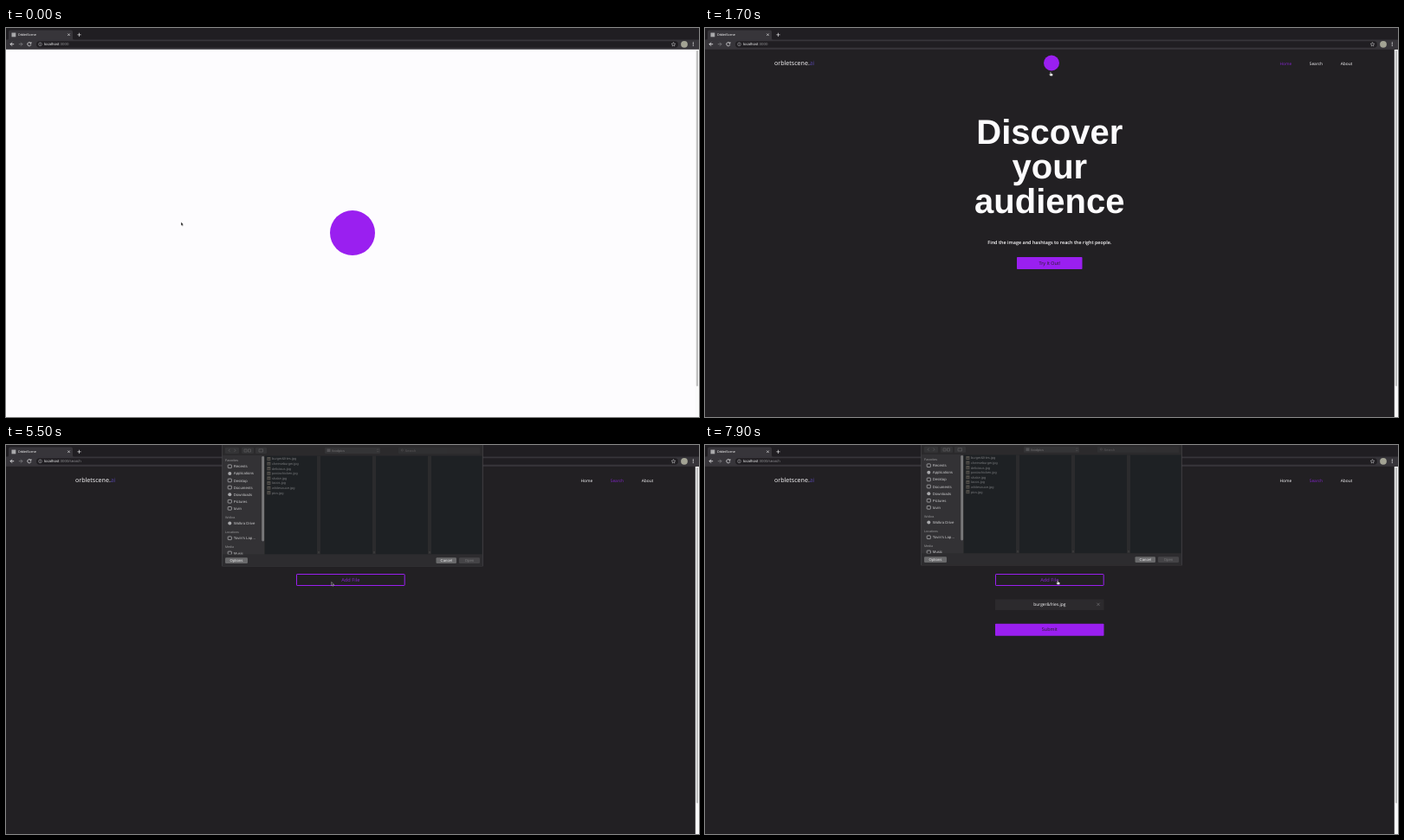
These frames come from a looping animation (800x450 px, 8 s). An HTML page:

```html
<!DOCTYPE html>
<html lang="en">
<head>
<meta charset="utf-8">
<title>OrbletScene</title>
<style>
  html, body { margin: 0; width: 100%; height: 100%; overflow: hidden; background: #222023; }
  svg { display: block; width: 800px; height: 450px; --bg: #fdfcfe; --fg: #2a282c; --accent: #9a1ff0; --tld: #9a1ff0; }
  text { font-family: "Open Sans", "Noto Sans", sans-serif; text-rendering: geometricPrecision; white-space: pre; }
  .ui { font-family: "Liberation Sans", Arial, sans-serif; }
  .mid { text-anchor: middle; }
</style>
</head>
<body>
<svg id="stage" viewBox="0 0 800 450" xmlns="http://www.w3.org/2000/svg"></svg>
<script>
const LOOP = 8000;
const PURPLE = '#9a1ff0';
const LIGHT = [253, 252, 254], DARK = [34, 32, 35];
const HANDLE = 'heartysupperlane';
const stage = document.getElementById('stage');

// Markup helpers
const rect = (x, y, w, h, fill, more = '') =>
  `<rect x="${x}" y="${y}" width="${w}" height="${h}" fill="${fill}" ${more}/>`;
const disc = (x, y, r, fill, more = '') => `<circle cx="${x}" cy="${y}" r="${r}" fill="${fill}" ${more}/>`;
const line = (d, color, width = 0.8, more = '') =>
  `<path d="${d}" fill="none" stroke="${color}" stroke-width="${width}" ${more}/>`;
const label = (x, y, size, fill, str, more = '') =>
  `<text x="${x}" y="${y}" font-size="${size}" fill="${fill}" ${more}>${str}</text>`;
const mid = (y, size, fill, str, more = '') => label(397.8, y, size, fill, str, `class="mid" ${more}`);
const ui = (x, y, size, fill, str, more = '') => label(x, y, size, fill, str, `class="ui" ${more}`);
const group = (id, content) => `<g id="${id}">${content}</g>`;

function browser() {
  const icon = '#e4e4e6';
  return rect(0, 0, 800, 14, '#201e22') +
    '<path d="M1 14q2 0 2-2V4.500q0-2 2-2H75q2 0 2 2V12q0 2 2 2z" fill="#37353a"/>' +
    rect(0, 13.5, 800, 11.3, '#37353a') +
    rect(6.5, 5.500, 4.8, 4.8, '#a9a9ab') +
    ui(13.7, 9.2, 3.8, '#eeeeef', 'OrbletScene') +
    line('M71.300 6.500l2.400 2.400m0-2.400l-2.400 2.400M82.400 7.800h4.200m-2.100-2.100v4.200', icon, 0.7) +
    line('M9.200 18.700H5m2-2l-2 2 2 2', icon, 0.9) +
    line('M14.800 18.700H19m-2-2l2 2-2 2', '#77767a', 0.9) +
    line('M28.700 17.600a2.100 2.100 0 1 0 .2 1.700M29 16.300v1.600h-1.600', icon, 0.8) +
    rect(35, 15.300, 741, 7.400, '#201e22', 'rx="3.700"') +
    disc(39.500, 18.800, 1.900, 'none', 'stroke="#b9b9bc" stroke-width=".5"') +
    line('M39.500 18.500v1.300M39.500 17.500v.5', '#b9b9bc', 0.5) +
    `<text class="ui" x="44" y="20.300" font-size="4.400" fill="#f2f2f3">localhost<tspan fill="#8d8c90">:3000</tspan><tspan id="route" fill="#8d8c90">/search</tspan></text>` +
    line('M770.500 16.600l.7 1.500 1.600.2-1.200 1.100.3 1.600-1.400-.8-1.400.8.3-1.600-1.200-1.100 1.600-.2z', '#d6d6d8', 0.5) +
    disc(783, 18.800, 3.900, '#a3a394') +
    [16.900, 18.700, 20.500].map(y => disc(793.300, y, 0.6, icon)).join('');
}

function header() {
  const nav = (id, x, str) => label(x, 42.700, 4.8, 'var(--fg)', str, `id="${id}"`);
  return `<text x="80" y="43.200" font-size="7.100" fill="var(--fg)">orbletscene.<tspan fill="var(--tld)">ai</tspan></text>` +
    disc(400, 40.500, 9, PURPLE) +
    nav('navHome', 663.500, 'Home') + nav('navSearch', 697.800, 'Search') + nav('navAbout', 733.800, 'About');
}

const button = (x, y, w, textY, str) => rect(x, y, w, 14, PURPLE, 'rx=".8"') + mid(textY, 5.4, 'var(--bg)', str);

function home() {
  const lines = ['Discover', 'your', 'audience'].map((word, i) =>
    mid(134 + i * 40, 40, 'var(--fg)', word, 'style="font-family:\'Liberation Sans\',Arial,sans-serif;font-weight:700"'));
  return lines.join('') +
    mid(249.700, 5.45, 'var(--fg)', 'Find the image and hashtags to reach the right people.', 'font-weight="600"') +
    button(360, 265, 75.500, 273.900, 'Try It Out!');
}

function ask() {
  return mid(118.700, 7.4, 'var(--fg)', 'What Is Your Pictovale Handle?') +
    rect(335, 142.500, 125.500, 14, '#2c2a2d') +
    rect(335, 155.500, 125.500, 1.2, PURPLE) +
    label(337.900, 151.600, 6.4, '#7f2bbd', '@') +
    label(347.500, 150.800, 4.9, 'var(--fg)', '', 'id="typed"') +
    button(335, 163, 125.500, 171.800, 'Submit');
}

function pics() {
  return mid(118.700, 7.4, 'var(--fg)', 'What Pics Are You Considering?') +
    rect(335.500, 149.500, 124.700, 13, 'none', `stroke="${PURPLE}" rx=".6"`) +
    mid(157.800, 5.7, '#8d22da', 'Add File') +
    group('upload',
      rect(335, 178.500, 125.500, 12.500, '#2c2a2d') +
      mid(186.100, 4.9, 'var(--fg)', 'burger&amp;fries.jpg') +
      line('M452.300 182.700l3.400 3.400m0-3.400l-3.400 3.400', '#8c8a8e', 0.5) +
      button(335, 206.700, 125.500, 215.400, 'Submit'));
}

function dialog() {
  const heads = [[18.800, 'Favorites'], [84.900, 'Wolkra'], [102.100, 'Locations'], [119.300, 'Media']];
  const items = [[26.300, 'Recents'], [34.400, 'Applications'], [42.500, 'Desktop'], [50.600, 'Documents'],
    [58.700, 'Downloads'], [66.800, 'Pictures'], [74.900, 'tovin'], [92.100, 'Wolkra Drive'],
    [109.300, 'Tovin\'s Lap…'], [126.500, 'Music']];
  const files = ['burger&amp;fries', 'cheeseburger', 'delicious', 'pastachicken', 'shake', 'tacos', 'whitesauce', 'pics'];
  const control = (x, w, fill = '#434345') => rect(x, 2.700, w, 7.200, fill, 'rx="1.200"');
  const push = (x, w, str, fill, color, id) => `<g id="${id}">` + rect(x, 130.200, w, 6.800, fill, 'rx="1.200"') +
    ui(x + w / 2, 135.100, 4.3, color, str, 'text-anchor="middle"') + '</g>';
  const sidebar = heads.map(([y, s]) => ui(253, y, 3.7, '#98989a', s)).join('') +
    items.map(([y, s], i) => (i % 3 === 1 ? disc(258.300, y - 1.500, 2, '#aaaaad')
      : rect(256.200, y - 3.400, 4.2, 3.700, 'none', 'stroke="#aaaaad" stroke-width=".8" rx=".6"')) +
      ui(262.800, y, 4.3, '#c9c9cb', s)).join('');
  const rows = files.map((name, i) => {
    const y = 16 + i * 5.6;
    return rect(301.400, y - 2, 4, 4, '#99907f') + rect(302, y - 0.2, 2.8, 1.2, '#514a46') +
      ui(307, y + 1.400, 4, '#d8d8da', name + '.jpg');
  }).join('');
  return rect(249.700, -1, 300.600, 141, '#2b2a2c', 'stroke="#49484b" stroke-width=".7"') +
    rect(250, 12, 48.500, 115, '#333235') + sidebar +
    rect(295.200, 13, 2.900, 98.500, '#777779', 'rx="1.400"') +
    rect(298.700, 12.500, 250.800, 114, '#1e2124') +
    [359, 423, 487].map(x => rect(x, 12.500, 4, 114, '#2b2b2d') +
      line(`M${x + 1.500} 123v2.500m1-2.500v2.500`, '#5b5b5e', 0.3)).join('') +
    rect(250, 126.500, 300, 13.500, '#2d2c2f') +
    rect(299, 13.200, 60, 5.600, '#55575c', 'id="selection"') +
    group('files', rows) +
    group('tools',
      control(253, 16) + control(272, 14) + control(288, 13) + control(368, 64) + control(453, 94, '#39393b') +
      line('M258.500 4.700l-1.500 1.600 1.500 1.600m5-3.200l1.500 1.600-1.500 1.600M275 5h3v3h-3zm4.500 0h3v3h-3zM292 4.800h4.500v3.200H292z', '#c8c8ca', 0.5) +
      rect(370.500, 4.500, 4, 3.500, '#8d8d90') + ui(376.200, 7.900, 4, '#d4d4d6', 'foodpics') +
      line('M428.300 5.700l1-1 1 1m-2 1.400l1 1 1-1', '#c8c8ca', 0.4) +
      disc(457.300, 6, 1.1, 'none', 'stroke="#aaa" stroke-width=".4"') + ui(460.500, 7.700, 4, '#9a9a9c', 'Search')) +
    push(253, 26, 'Options', '#69696b', '#f2f2f3', 'options') +
    push(496.500, 23.500, 'Cancel', '#69696b', '#f2f2f3', 'cancel') +
    push(523, 24, 'Open', '#69696b', '#e8e8ea', 'open');
}

stage.innerHTML =
  rect(0, 0, 800, 450, 'var(--bg)') +
  group('loader', disc(400, 237, 26, PURPLE)) +
  group('header', header()) + group('home', home()) + group('ask', ask()) + group('pics', pics()) +
  rect(795.800, 24.800, 4.2, 426, '#fafafa') + rect(796.800, 26, 2.200, 388.500, '#bebebf', 'rx="1.100"') +
  browser() + group('dialog', dialog()) +
  group('cursor',
    '<path id="arrow" d="M0 0v4.200l1-.9.7 1.500.8-.4-.7-1.400h1.300z" stroke-width=".4"/>' +
    '<path id="hand" d="M-.4 0q.6-.6 1 0v1.500l1.600.5q.6.200.5.900l-.4 1.700h-2.400l-1.500-1.900q.300-.7 1.200 0z" fill="#fff" stroke="#222" stroke-width=".35"/>');

const el = Object.fromEntries([...stage.querySelectorAll('[id]')].map(node => [node.id, node]));

// Timing helpers
const ramp = (t, from, to) => Math.min(1, Math.max(0, (t - from) / (to - from)));
const smooth = u => u * u * (3 - 2 * u);
const easeOut = u => 1 - (1 - u) ** 3;
const within = (t, from, to) => t >= from && t < to;
const mix = (a, b, k) => `rgb(${a.map((v, i) => Math.round(v + (b[i] - v) * k))})`;
const fade = (node, o) => {
  node.setAttribute('opacity', o);
  node.style.display = o > 0 ? '' : 'none';
};

// Pointer path: time, x, y
const path = [[0, 202, 224.500], [500, 202, 224.500], [1400, 400, 41], [1500, 401, 41], [1700, 398.800, 51],
  [2350, 396, 272], [2600, 396, 272], [3000, 385, 149], [3800, 385, 149], [4150, 374.800, 175], [4700, 374.800, 175],
  [5050, 375.700, 158.500], [5550, 375.700, 158.500], [5850, 322, 16], [6000, 322, 16], [6250, 533, 134],
  [6900, 532.200, 135.500], [7200, 532.200, 135.500], [7650, 407, 157], [8000, 407, 157]];

function pointerAt(t) {
  const i = Math.max(1, path.findIndex(p => p[0] > t));
  const [t0, x0, y0] = path[i - 1], [t1, x1, y1] = path[i];
  const k = smooth(ramp(t, t0, t1));
  return [x0 + (x1 - x0) * k, y0 + (y1 - y0) * k];
}

function render(t) {
  const dark = smooth(ramp(t, 1520, 1700));
  stage.style.setProperty('--bg', mix(LIGHT, DARK, dark));
  stage.style.setProperty('--fg', mix([42, 40, 44], LIGHT, dark));
  stage.style.setProperty('--tld', mix([154, 31, 240], [82, 66, 156], dark));
  stage.style.setProperty('--accent', mix([154, 31, 240], [132, 36, 206], dark));

  const entered = ramp(t, 600, 900);
  const searching = t >= 2600;
  fade(el.loader, 1 - ramp(t, 450, 600));
  fade(el.header, entered);
  fade(el.home, entered * (1 - ramp(t, 2500, 2600)));
  fade(el.ask, ramp(t, 2600, 2900) * (1 - ramp(t, 4450, 4700)));
  fade(el.pics, ramp(t, 4700, 5050));
  el.route.textContent = searching ? '/search' : '';
  el.navHome.setAttribute('fill', searching ? 'var(--fg)' : 'var(--accent)');
  el.navSearch.setAttribute('fill', searching ? 'var(--accent)' : 'var(--fg)');
  el.typed.textContent = HANDLE.slice(0, Math.floor(ramp(t, 3100, 3900) * HANDLE.length));

  const uploaded = ramp(t, 6800, 7050);
  fade(el.upload, uploaded);
  el.upload.setAttribute('transform', `translate(0 ${(1 - uploaded) * 0.8})`);

  const again = t > 7000;
  const shown = again ? easeOut(ramp(t, 7740, 7940))
    : easeOut(ramp(t, 5300, 5500)) * (1 - smooth(ramp(t, 6300, 6500)));
  const picked = within(t, 5900, 7000);
  const active = again ? 0 : ramp(t, 5550, 5700);
  el.dialog.style.display = shown > 0 ? '' : 'none';
  el.dialog.setAttribute('transform', `translate(0 ${(shown - 1) * 141})`);
  fade(el.files, 0.45 + 0.55 * active);
  fade(el.tools, 0.4 + 0.6 * active);
  fade(el.selection, picked ? 1 : 0);
  fade(el.open, picked ? 1 : 0.4);

  const [x, y] = pointerAt(t);
  const hand = within(t, 1350, 1800) || within(t, 2250, 2650) || within(t, 4100, 5350) || t >= 7600;
  el.cursor.setAttribute('transform', `translate(${x} ${y})`);
  el.cursor.style.display = within(t, 3100, 3800) ? 'none' : '';
  el.hand.style.display = hand ? '' : 'none';
  el.arrow.style.display = hand ? 'none' : '';
  el.arrow.setAttribute('fill', dark > 0.5 ? '#18171a' : '#111');
  el.arrow.setAttribute('stroke', dark > 0.5 ? '#e8e8ea' : '#fff');
}

const start = performance.now();
function tick() {
  render((performance.now() - start) % LOOP);
  requestAnimationFrame(tick);
}
tick();
</script>
</body>
</html>
```
